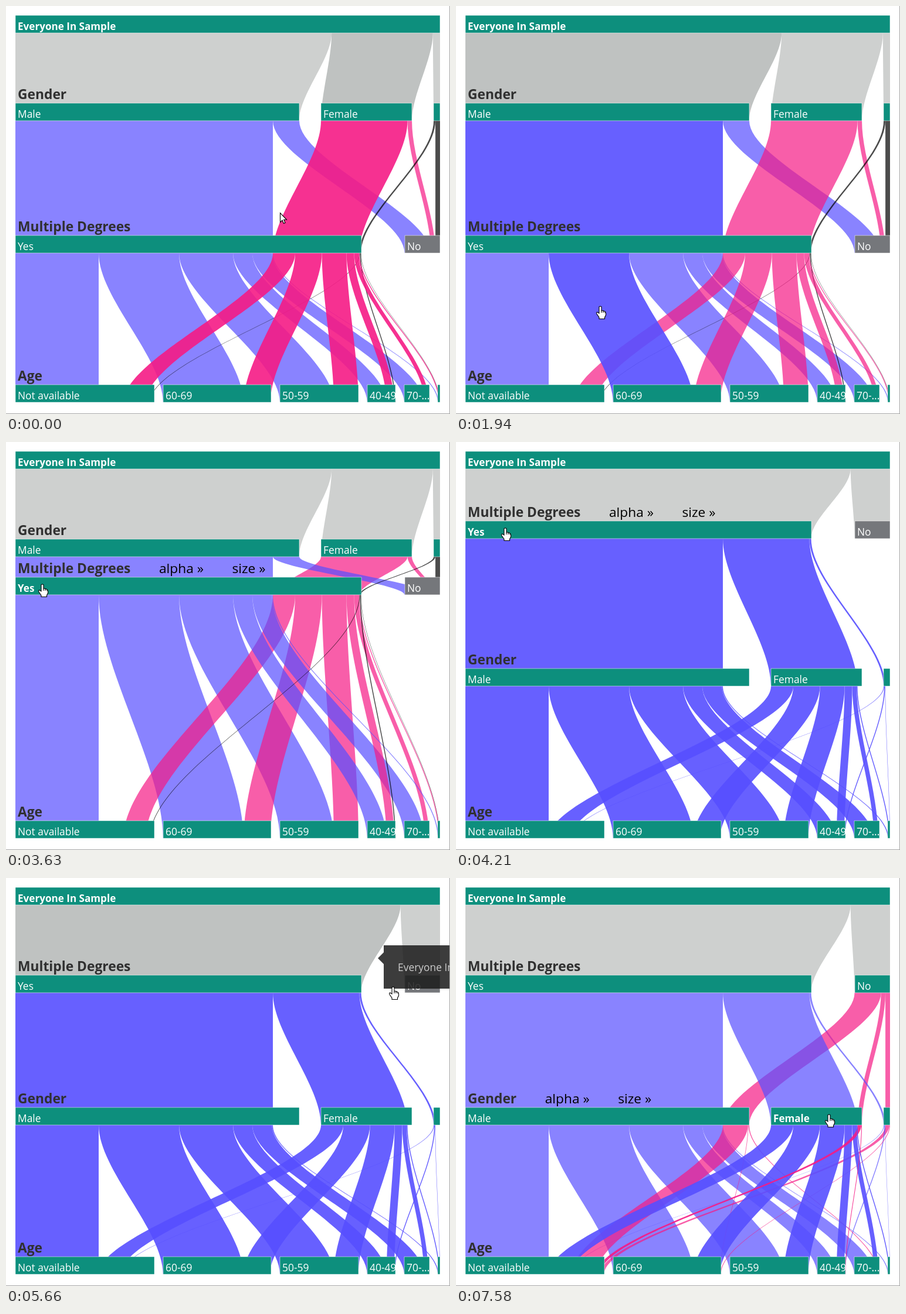
Write an HTML page with a canvas that moves like this. It is 757x697 px and loops after 8 s.

```html
<!DOCTYPE html>
<html lang="en">
<head>
<meta charset="utf-8">
<title>Parallel sets</title>
<style>
  html, body { margin: 0; width: 100%; height: 100%; overflow: hidden; background: #fff; }
  canvas { display: block; }
</style>
</head>
<body>
<canvas id="stage" width="757" height="697"></canvas>
<script>
const ctx = document.getElementById('stage').getContext('2d');
const LOOP = 8000, STEP = 145, LEFT = 16, WIDTH = 724, BAR = 30, TENSION = 0.7;
const GRAB = 3390, SWAP = 3760, DROP = 4400, REVEAL = 6250;
const FONT = '"Open Sans", "Noto Sans", sans-serif';
const TEAL = '#0d8f7d', GREY = '#75777b';
const ROOT = '185,188,187', HUES = ['87,79,255', '246,27,133', '0,0,0'];

// Counts per gender and degree, split by age group
const data = {
  MY: [142, 137, 92, 33, 33.5, 1.5],
  MN: [42.7, 0.8, 0, 0, 1.5],
  FY: [38, 45.5, 42, 13, 7.5, 1.5],
  FN: [6.5, 0, 0, 1],
  OY: [1, 0, 0, 1.5, 0, 0.5],
  ON: [6.7, 1.2]
};
const dims = {
  g: { cats: 'MFO', title: 'Gender' },
  d: { cats: 'YN', title: 'Multiple Degrees' },
  a: { cats: '012345', title: 'Age' }
};
const names = {
  M: 'Male', F: 'Female', Y: 'Yes', N: 'No',
  0: 'Not available', 1: '60-69', 2: '50-59', 3: '40-49', 4: '70-...'
};

// Pointer moves: start, end, x, y
const moves = [
  [0, 0, 467, 353], [760, 1030, 449, 284], [1490, 1940, 246, 513], [2210, 3090, 62, 404],
  [GRAB, 3630, 62, 243], [SWAP, 4210, 84, 147], [4330, 4330, 84, 147], [4480, 5660, 660, 186],
  [5810, 5960, 704, 186], [REVEAL, 6550, 704, 186], [6700, 7150, 640, 350], [7300, 7580, 636, 404]
];
// Time, highlighted path (or @category), bold category, dimension with links
const hovers = [
  [0, 'FY'], [1490, 'MY1'], [2357, 'MY0'], [2780, '', 'Y', 'd'], [SWAP, '@Y', 'Y', 'd'],
  [4620, 'Y'], [5810, '', 'N', 'd'], [6850, 'NM'], [7000, 'YF'], [7440, '@F', 'F', 'g']
];

const lastAt = (list, t) => list.filter(k => k[0] <= t).pop();

// Hold the picture between the steps of each move
function sample(t) {
  const move = lastAt(moves, t), [start, end, x, y] = move;
  const gaps = Math.round((end - start) / STEP);
  const gap = (end - start) / gaps || 0;
  const k = gaps ? Math.min(gaps, Math.floor((t - start) / gap + 1e-6)) : 0;
  const [, , px, py] = moves[Math.max(0, moves.indexOf(move) - 1)];
  const f = 1 - (1 - (k + 1) / (gaps + 1)) ** 3;
  return { t: start + gap * k, x: px + (x - px) * f, y: py + (y - py) * f };
}

function ease(t, start, span) {
  const u = Math.max(0, Math.min(1, (t - start) / span));
  return u < 0.5 ? 4 * u ** 3 : 1 - 4 * (1 - u) ** 3;
}

function layout(order) {
  const leaves = [], sums = {}, nodes = {};
  for (const a of dims[order[0]].cats)
    for (const b of dims[order[1]].cats)
      (data[a + b] || data[b + a]).forEach((v, i) => { if (v) leaves.push([a + b + i, v]); });
  let total = 0;
  for (const [path, v] of leaves) {
    total += v;
    for (const c of path) sums[c] = (sums[c] || 0) + v;
  }
  for (const id of order) {
    const { cats } = dims[id], gap = (WIDTH - total) / (cats.length - 1);
    let x = LEFT;
    for (const c of cats) {
      nodes[c] = { x, w: sums[c] };
      x += sums[c] + gap;
    }
  }
  const ribbons = [];
  for (let level = 1; level <= 3; level++) {
    const flows = new Map(), out = {}, into = {};
    for (const [path, v] of leaves) {
      const p = path.slice(0, level);
      flows.set(p, (flows.get(p) || 0) + v);
    }
    const scale = level === 1 ? WIDTH / total : 1;
    for (const [p, v] of flows) {
      const from = p[level - 2] || 'root', to = p[level - 1];
      const used = out[from] || 0, filled = into[to] || 0;
      ribbons.push({
        p, level,
        sx: (level === 1 ? LEFT : nodes[from].x) + used, sw: v * scale,
        tx: nodes[to].x + filled, tw: v
      });
      out[from] = used + v * scale;
      into[to] = filled + v;
    }
  }
  ribbons.sort((a, b) => b.tw - a.tw);
  return { order, nodes, ribbons };
}
const before = layout('gda'), after = layout('dga');

function ribbon({ sx, sw, tx, tw }, sy, ty, fill) {
  const m0 = TENSION * sy + (1 - TENSION) * ty, m1 = TENSION * ty + (1 - TENSION) * sy;
  ctx.beginPath();
  ctx.moveTo(sx, sy);
  ctx.bezierCurveTo(sx, m0, tx, m1, tx, ty);
  ctx.lineTo(tx + tw, ty);
  ctx.bezierCurveTo(tx + tw, m1, sx + sw, m0, sx + sw, sy);
  ctx.fillStyle = fill;
  ctx.fill();
}

function text(str, x, y, size, color, bold) {
  ctx.font = `${bold ? 'bold ' : ''}${size}px ${FONT}`;
  ctx.fillStyle = color;
  ctx.fillText(str, x, y);
  return ctx.measureText(str).width;
}

function bar(x, w, bottom, label, bold, color) {
  const x0 = Math.round(x), x1 = Math.round(x + w), top = Math.round(bottom) - BAR;
  ctx.save();
  ctx.beginPath();
  ctx.rect(x0, top, x1 - x0, BAR);
  ctx.fillStyle = color;
  ctx.fill();
  ctx.strokeStyle = 'rgba(255,255,255,0.5)';
  ctx.stroke();
  ctx.clip();
  if (label) text(label, x0 + 4, top + 25, bold ? 17.1 : 17.4, '#fff', bold);
  ctx.restore();
}

function heading(title, bottom, links) {
  const y = Math.round(bottom) - BAR - 7;
  let x = 20 + text(title, 20, y, 22.8, '#303030', true);
  if (!links) return;
  for (const link of ['alpha »', 'size »']) x += 48.5 + text(link, x + 48.5, y, 22.7, '#000');
}

function tooltip() {
  ctx.beginPath();
  ctx.rect(644, 115, 113, 74);
  ctx.moveTo(644, 127);
  ctx.lineTo(634, 137);
  ctx.lineTo(644, 147);
  ctx.fillStyle = 'rgba(28,28,28,0.86)';
  ctx.fill();
  text('Everyone In Sample', 668, 159, 17.4, '#ccc');
}

const arrow = new Path2D('M.5 .5V16.5L4 13 6.5 18.5 9 17.5 6.7 12H11.5Z');
const hand = new Path2D('M-2 1Q0-1 2 1V7L5 7.5 8 9Q9.5 10 9.5 12V15L7.5 19V21.5H-2V19L-6 13Q-7 10-5 10L-2 12Z');
const knuckles = new Path2D('M2 7V11M5 8V11M8 9.5V11.5');

function cursor(x, y, pointing) {
  ctx.save();
  ctx.translate(Math.round(x), Math.round(y));
  ctx.fillStyle = '#fff';
  ctx.strokeStyle = '#000';
  ctx.lineWidth = 1.1;
  const shape = pointing ? hand : arrow;
  ctx.fill(shape);
  ctx.stroke(shape);
  if (pointing) ctx.stroke(knuckles);
  ctx.restore();
}

// A path lights its ancestors and descendants, a category only what leaves it
function lit(path, p) {
  if (path[0] === '@') return p.slice(0, -1).includes(path[1]);
  return path !== '' && (p.startsWith(path) || path.startsWith(p));
}

function draw({ t, x, y }) {
  const { order, nodes, ribbons } = t < SWAP ? before : after;
  const [, path, bold, linked] = lastAt(hovers, t);
  const filtered = t < REVEAL;
  const held = t >= GRAB && t < DROP;
  const bottoms = {
    g: 196 + 226 * ease(t, 3720, 595),
    d: t < GRAB ? 422 : held ? y + 18 : 165 + 31 * ease(t, DROP, 500),
    a: 677
  };
  const ys = [46, ...[...order].map(id => bottoms[id])];

  // Smaller ribbons lie on top; hovering lifts ribbons until the next layout
  const sorted = [0, GRAB, SWAP, REVEAL].filter(k => k <= t).pop();
  const recent = hovers.filter(h => h[0] >= sorted && h[0] <= t);
  const rank = p => recent.findLastIndex(h => lit(h[1], p));

  ctx.fillStyle = '#fff';
  ctx.fillRect(0, 0, 757, 697);

  ribbons
    .filter(r => !(filtered && r.p.slice(0, -1).includes('N')))
    .sort((a, b) => rank(a.p) - rank(b.p))
    .forEach(r => {
      const rgb = r.level === 1 ? ROOT : HUES[dims[order[0]].cats.indexOf(r.p[0])];
      ribbon(r, ys[r.level - 1], ys[r.level], `rgba(${rgb},${lit(path, r.p) ? 0.9 : 0.7})`);
    });

  bar(LEFT, WIDTH, 46, 'Everyone In Sample', true, TEAL);
  for (const id of 'gda') {
    heading(dims[id].title, bottoms[id], linked === id);
    for (const c of dims[id].cats)
      bar(nodes[c].x, nodes[c].w, bottoms[id], names[c], c === bold,
        c === 'N' && filtered ? GREY : TEAL);
  }

  if (t >= 5500 && t < 5810) tooltip();
  ctx.fillStyle = '#a6a6a6';
  ctx.fillRect(756, 0, 1, 697);
  ctx.fillRect(0, 696, 757, 1);
  cursor(x, y, t >= 1490);
}

const start = performance.now();
function tick() {
  draw(sample((performance.now() - start) % LOOP));
  requestAnimationFrame(tick);
}
tick();
</script>
</body>
</html>
```
